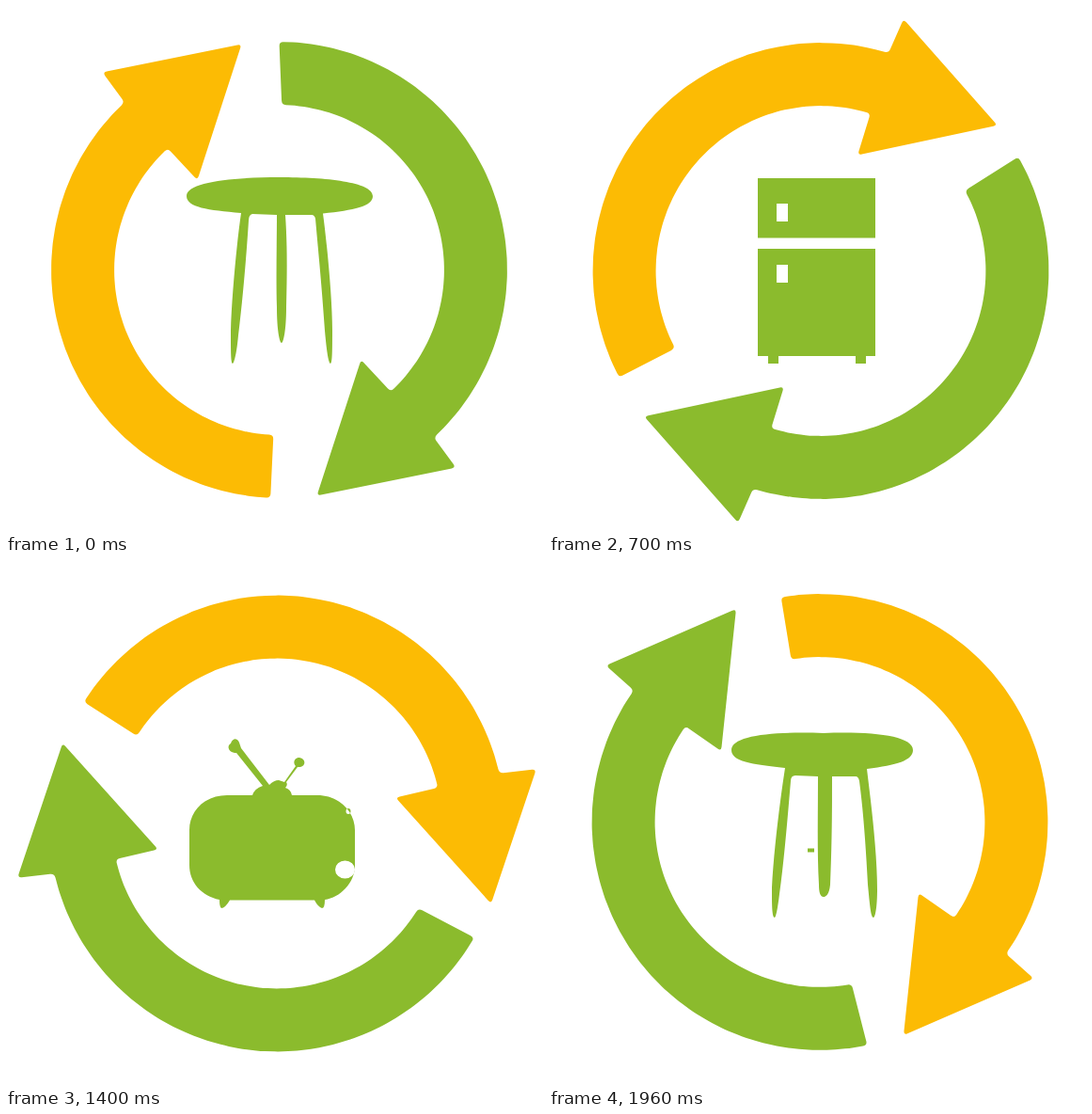
Animation, 571 px wide and 559 px high, one loop 2030 ms. Source, as an HTML page:

```html
<!DOCTYPE html>
<html lang="en">
<head>
<meta charset="utf-8">
<title>Reuse cycle</title>
<style>
  html, body { margin: 0; width: 100%; height: 100%; overflow: hidden; background: #fff; }
  svg { display: block; width: 100%; height: 100%; }
</style>
</head>
<body>
<svg viewBox="0 0 571 559">
  <g id="ring">
    <path id="orange" fill="#fcbb04"/>
    <path id="green" fill="#8bbb2d" transform="rotate(180)"/>
  </g>
  <path id="icon" fill="#8bbb2d"/>
  <path id="cutA" fill="#fff"/>
  <path id="cutB" fill="#fff"/>
</svg>
<script>
const LOOP = 2030, STEP = 70, TURN = 6, SAMPLES = 240;
const $ = id => document.getElementById(id);
const lerp = (a, b, k) => a + (b - a) * k;

// Polygon with softened corners
function softPath(pts, cut) {
  const toward = (p, q) => {
    const len = Math.hypot(q[0] - p[0], q[1] - p[1]);
    const k = Math.min(cut, len / 2) / len;
    return [lerp(p[0], q[0], k).toFixed(2), lerp(p[1], q[1], k).toFixed(2)];
  };
  return pts.map((p, i) => {
    const prev = pts[(i + pts.length - 1) % pts.length];
    const next = pts[(i + 1) % pts.length];
    return `${i ? 'L' : 'M'}${toward(p, prev)}Q${p} ${toward(p, next)}`;
  }).join('') + 'Z';
}

// Points on a circle, angles in degrees clockwise from the bottom
function arc(r, from, to, n = 30) {
  return Array.from({ length: n + 1 }, (_, i) => {
    const a = lerp(from, to, i / n) * Math.PI / 180;
    return [-r * Math.sin(a), r * Math.cos(a)];
  });
}

function arrow(outerTail, innerTail) {
  return softPath([
    ...arc(242.5, outerTail, 137.3),
    [-187.8, -210], [-40, -240], [-87, -95.5],
    ...arc(175.5, 137.5, innerTail)
  ], 4.5);
}

$('orange').setAttribute('d', arrow(2.2, 2));
$('green').setAttribute('d', arrow(0, 0.9));

const ellipse = (x, y, rx, ry) =>
  `M${x - rx} ${y}a${rx} ${ry} 0 1 0 ${2 * rx} 0a${rx} ${ry} 0 1 0 ${-2 * rx} 0Z`;

// Each outline starts at the top centre and runs clockwise; cut = white details, add = loose bits
const stool = {
  d: `M291 182C340 182 390 187 390 202C390 213 370 217 337 220.5C341 250 347 310 347 345
    C347 365 347 380 345 380C343 380 341 368 339 345C336 300 332 260 329 226Q328 222 325 222
    L297 222C299 250 299 280 298 320C298 345 295 358 293 358C291 358 288 345 288 320
    C287 290 288 250 288 222L262 221Q258 222 258 228C256 260 252 310 247 350
    C245 372 242 380 241 380C239 380 239 365 239 345C240 310 245 255 250 220
    C215 217 192 214 192 202C192 187 240 182 291 182Z`
};
const stoolLike = {
  d: `M292 184C345 182 387 187 387 202C387 213 370 218 338 222C342 255 349 310 349 350
    C349 368 347 380 345 380C342 380 341 365 339 345C337 305 334 265 330 235Q329 230 326 230
    L301 230C301 260 301 300 299 345C298 356 294 358 292 358C288 358 287 352 287 345
    C285 310 286 270 286 230L262 229Q257 229 257 235C254 270 250 320 245 355
    C243 372 241 380 240 380C237 380 237 365 237 348C239 310 245 260 251 221
    C215 217 194 214 194 202C194 187 235 182 292 184Z`,
  add: 'M275 306.5h7v4h-7Z'
};
const stoolFridge = {
  d: `M284 195L321 195L321 229C333 230 343 233 347 238Q345 241 336 242C341 250 344 262 346 270
    L347 280L347 360Q346 376 342 376Q338 375 336 362C334 345 332 330 331 318Q330 315 328 315
    L319 315Q316 315 316 319C316 335 315 350 314 365L313 371L312 366Q305 362 303 356
    C298 343 296 325 292 314Q291 310 287 310L271 310Q267 310 265 314C258 325 254 345 247 358
    Q245 362 245 368L244 377L236 381L235 376L229 371L231 257Q233 248 238 242Q228 241 226 238
    Q230 230 247 229L247 195Z`,
  cut: 'M247 214h5v11h-5ZM244 278h8v12h-8Z',
  add: 'M244 214h3v11h-3Z'
};
const fridge = {
  d: 'M285 183H347V372H337V380H326V372H244V380H233V372H222V183Z',
  cut: 'M215 246.5H352V258H215ZM242 210h12v19h-12ZM242 275h12v19h-12Z'
};
const chair = {
  d: `M291 182C325 182 353 202 363.5 231L369 238C383 238 392 249 390 262C388 272 379 282 374 294
    L369 303V345Q369 353 361 353H356L354 380H345L343 353H240L239 380H228L226 353H221
    Q213 353 213 345V303L208 294C203 282 194 272 192 262C190 249 199 238 213 238
    L218.5 231C229 202 257 182 291 182Z`,
  cut: `M212 238L219 231C238 242 251 262 262 288L254 288C245 268 234 251 216 239Z
    M370 238L363 231C344 242 331 262 320 288L328 288C337 268 348 251 366 239Z
    M207 295L209 294Q211 287 220 286.5H362Q371 287 373 294L376 295V305H369Q369 296 360 296
    H222Q213 296 213 305H206ZM224 353H358V362.5H224Z`
};
const chairTv = {
  d: `M290 234L296 236L308 219C304 214 308 210 312 210C319 211 319 219 313 220L310 220L298 236
    Q300 239 297 242Q303 244 304 250H331C355 250 371 268 371 287V325C371 343 355 359 339 361
    Q339 370 336 370Q332 369 328 361.5H238Q233 370 229 370Q227 369 227 361
    C208 357 195 343 195 324V287C195 266 212 250 235 250H262Q264 243 273 240L245 205
    C237 205 234 198 239 195C241 189 246 189 248 194L250 200L280 239Q285 234 290 234Z`,
  cut: ellipse(360.5, 329, 10.5, 9.5),
  add: ellipse(364, 267, 2.5, 3)
};
const tv = {
  d: `M291 232L299 232L316 209C312 203 318 199 322 200C330 200 331 211 323 212L320 212L303 234
    Q312 237 314 245H345C372 245 390 264 390 286V330C390 352 372 369 354 371Q354 380 351 380
    Q348 380 342 371.5H240Q235 380 231 380Q228 380 228 371C208 367 192 352 192 330V286
    C192 264 211 245 237 245H268Q270 237 280 234L248 193C241 195 238 187 242 183
    C248 179 255 185 253 190L287 232Z`,
  cut: ellipse(362, 324, 11.5, 10)
};

for (const shape of [stool, stoolLike, stoolFridge, fridge, chair, chairTv, tv]) {
  const path = document.createElementNS('http://www.w3.org/2000/svg', 'path');
  path.setAttribute('d', shape.d);
  const total = path.getTotalLength();
  shape.pts = Array.from({ length: SAMPLES }, (_, i) => path.getPointAtLength(total * i / SAMPLES));
}

const poses = [
  [0, stool], [70, stool], [280, stoolFridge], [490, fridge], [700, fridge], [980, chair],
  [1120, chair], [1400, chairTv], [1540, tv], [1680, tv], [1960, stoolLike], [LOOP, stool]
];
const centres = [
  [0, 290.5, 280.5], [280, 290, 281], [700, 289, 281.5], [980, 288.5, 281],
  [1400, 288, 280], [1680, 287.6, 279], [1960, 288, 278.5], [LOOP, 288, 278.5]
];

// Neighbouring rows of a timed table and the progress between them
function between(rows, t) {
  const i = rows.findIndex((row, n) => t < rows[n + 1][0]);
  const [a, b] = [rows[i], rows[i + 1]];
  return [a, b, (t - a[0]) / (b[0] - a[0])];
}

function showCut(id, shape, opacity) {
  $(id).setAttribute('d', shape.cut || '');
  $(id).setAttribute('opacity', Math.max(0, opacity));
}

function draw(t) {
  const [c, d, m] = between(centres, t);
  $('ring').setAttribute('transform',
    `translate(${lerp(c[1], d[1], m)} ${lerp(c[2], d[2], m)}) rotate(${t / STEP * TURN})`);

  const [[, a], [, b], k] = between(poses, t);
  const still = a === b || k === 0;
  $('icon').setAttribute('d', still ? a.d + (a.add || '') :
    'M' + a.pts.map((p, i) =>
      `${lerp(p.x, b.pts[i].x, k).toFixed(1)} ${lerp(p.y, b.pts[i].y, k).toFixed(1)}`).join('L') + 'Z');
  showCut('cutA', a, still ? 1 : 1 - 2 * k);
  showCut('cutB', b, still ? 0 : 2 * k - 1);
}

const start = performance.now();
function tick() {
  const t = (performance.now() - start) % LOOP;
  draw(Math.floor(t / STEP) * STEP);
  requestAnimationFrame(tick);
}
tick();
</script>
</body>
</html>
```
